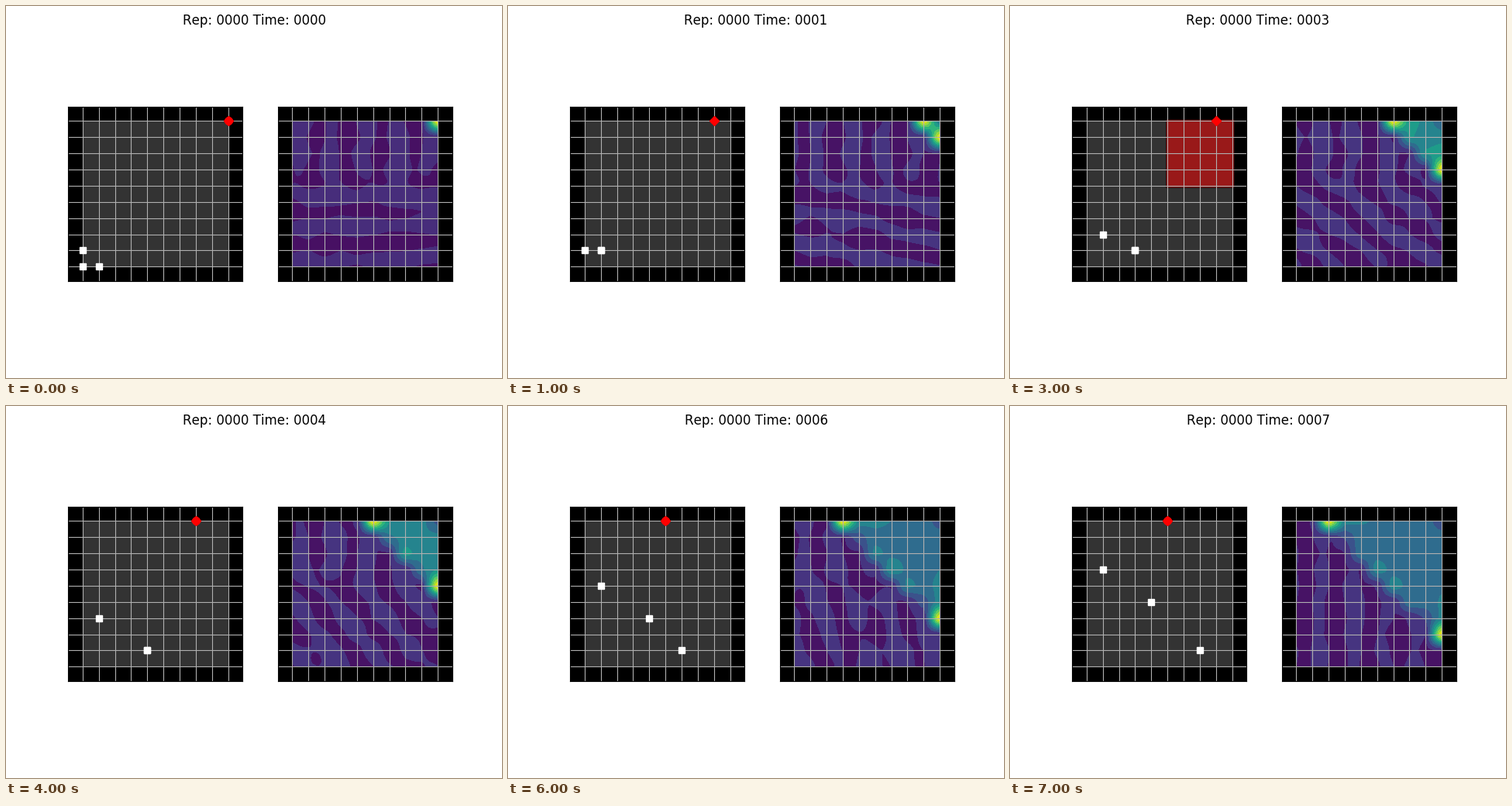
Animation of 640 by 480 pixels, one loop 8000 ms. Source, as a matplotlib script:

```python
import numpy as np
import matplotlib.pyplot as plt
from matplotlib.animation import FuncAnimation
from matplotlib.patches import Rectangle

plt.rcParams["text.kerning_factor"] = 6

STEPS = 8
N = 10
axis = np.linspace(0, N - 1, 181)
X, Y = np.meshgrid(axis, axis)

# Weights that spread cell values over the fine grid.
gap = np.clip(np.abs(axis[:, None] - np.arange(N)), 0, 1)
spread = 1 - 0.5 * gap - 1.5 * gap ** 2 + gap ** 3

target_x = [9, 8, 9, 8, 7, 6, 5, 5]


def searchers(t):
    climber = (np.clip(t - 1, 0, 1), max(1, t - 1))
    middle = (min(t, 4), max(min(t, 1), t - 3))
    runner = (max(t, 1), min(t, 1))
    return zip(climber, middle, runner)


def ripple(t):
    """Weak stripes: columns on top, below them turning from rows to columns."""
    angle = np.pi / 2 * (1 - t / (STEPS - 1))
    columns = np.cos(np.pi * (X - 0.5))
    turning = np.cos(np.pi * (np.cos(angle) * X + np.sin(angle) * Y - 0.5))
    top = 1 / (1 + np.exp(-3 * (Y - 5.3)))
    stripes = (-1) ** t * (top * columns + (1 - top) * turning)
    rough = np.random.default_rng(t).normal(size=(N, N))
    return np.clip(1.5 * (stripes + 0.8 * spread @ rough @ spread.T), -1, 1)


def cell_values(t):
    """Belief per cell: a diagonal front that leaves the top right corner."""
    inside = 0.31 + 0.4 * np.exp(-t / 3.2)
    v = np.zeros((N, N))
    for i in range(t + 1):
        for j in range(t + 1 - i):
            d = i + j
            if d == t:
                value = (inside + 0.12) * np.sin(np.pi * i / max(t, 1))
            elif d == 0:
                value = 0.6 * inside
            elif i * j == 0:
                value = inside * (1 + 0.3 * (d / t) ** 2)
            else:
                value = inside
            v[N - 1 - j, N - 1 - i] = value
    v[N - 1, N - 1 - t] = v[N - 1 - t, N - 1] = 1
    return v


def belief(t, low):
    rise = spread @ np.maximum(cell_values(t) - low, 0) @ spread.T
    calm = 1 - np.clip(rise / 0.1, 0, 1)
    return np.clip(low + rise + 0.02 * calm * ripple(t), 0, 0.9999)


fig, (left, right) = plt.subplots(1, 2, figsize=(6.4, 4.8), dpi=100)
for ax in (left, right):
    ax.set_facecolor("black")
    ax.set_aspect("equal")
    ax.set_xlim(-0.9, 9.9)
    ax.set_ylim(-0.9, 9.9)
    ax.set_xticks(range(N))
    ax.set_yticks(range(N))
    ax.tick_params(length=0, labelbottom=False, labelleft=False)
    ax.grid(True, color="#b0b0b0", lw=0.8)
    ax.set_axisbelow("line")

left.add_patch(Rectangle((0, 0), 9, 9, fc="0.2", ec="none"))
scan = left.add_patch(Rectangle((4.88, 4.88), 4.22, 4.22, lw=1,
                                fc=(1, 0, 0, 0.5), ec=(0, 0, 0, 0.5)))
target, = left.plot([], [], "D", color="red", ms=6)
blob, = left.plot([], [], "o", color="red", ms=7)
team, = left.plot([], [], "s", color="white", ms=6)
title = fig.suptitle("", fontsize=12)
filled = []


def update(t):
    while filled:
        filled.pop().remove()
    bands = 12 if t == 0 else 10
    filled.append(right.contourf(X, Y, belief(t, 1 / bands),
                                 levels=np.linspace(0, 1, bands + 1),
                                 cmap="viridis"))
    x = target_x[t]
    target.set_data([x], [9])
    blob.set_data([x], [9])
    blob.set_visible(x % 2 == 1)
    team.set_data(*searchers(t))
    scan.set_visible(t == 3)
    title.set_text(f"Rep: 0000 Time: {t:04d}")
    return []


anim = FuncAnimation(fig, update, frames=STEPS, interval=1000, repeat=True)
plt.show()
```
